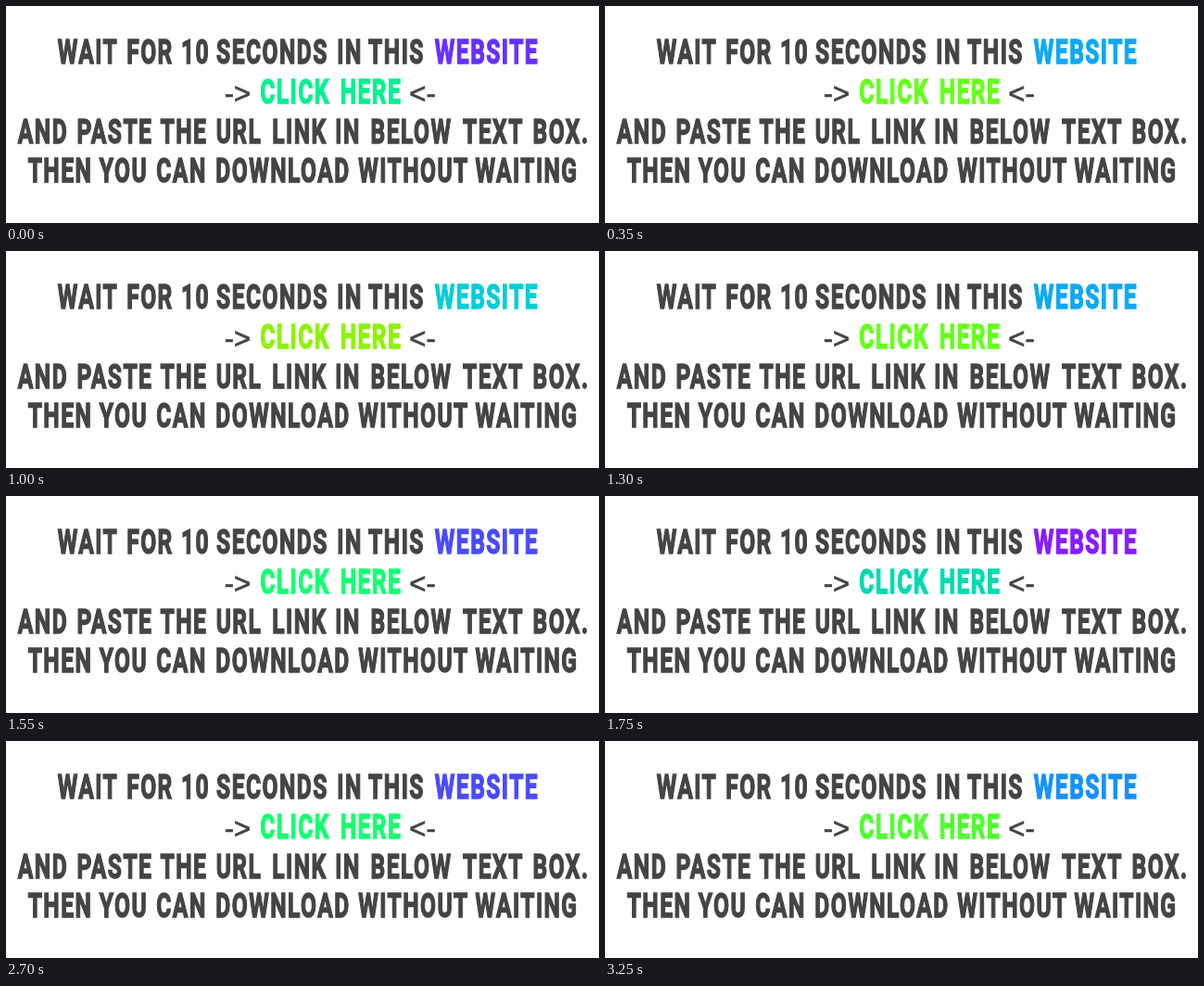
Write an HTML page that moves like this. It is 640 by 234 pixels and loops after 3900 ms.

```html
<!DOCTYPE html>
<html lang="en">
<head>
<meta charset="utf-8">
<style>
  html, body { margin: 0; width: 100%; height: 100%; overflow: hidden; background: #fff; }
  svg { display: block; width: 640px; height: 234px; }
  text { fill: currentColor; stroke: currentColor; text-anchor: middle; }
  .bold {
    font: 700 37px Roboto, "Liberation Sans", sans-serif;
    letter-spacing: 2.2px; stroke-width: 1.5; stroke-miterlimit: 3;
  }
  .thin { font: 31px "Liberation Sans", Arial, sans-serif; stroke-width: 0.7; }
</style>
</head>
<body>
<svg viewBox="0 0 640 234" color="#444"></svg>
<script>
const svg = document.querySelector("svg");
const LOOP = 3900, STEP = 50, LAST = 3250, CONDENSE = 0.665;

function addText(string, x, y, type) {
  const el = document.createElementNS("http://www.w3.org/2000/svg", "text");
  const scale = type === "bold" ? ` scale(${CONDENSE} 1)` : "";
  el.setAttribute("class", type);
  el.setAttribute("transform", `translate(${x} ${y})${scale}`);
  el.textContent = string;
  svg.append(el);
  return el;
}

// Each line: baseline, words, centre of each word
const lines = [
  [62.3, "WAIT FOR 10 SECONDS IN THIS WEBSITE", [88.5, 155.5, 204.5, 287.5, 371, 421.5, 519]],
  [104.8, "CLICK HERE", [312, 394]],
  [148.3, "AND PASTE THE URL LINK IN BELOW TEXT BOX.",
    [40, 117.5, 192, 251.5, 317, 369, 437.5, 526, 599]],
  [190.3, "THEN YOU CAN DOWNLOAD WITHOUT WAITING", [58.5, 127, 189.5, 299, 440, 562]]
];
const words = lines.map(([y, line, xs]) =>
  line.split(" ").map((word, i) => addText(word, xs[i], y, "bold")));
addText("->", 250, 105, "thin");
addText("<-", 449.5, 105, "thin");

const website = words[0][6];
const link = words[1];

// Hue swing: [time, degrees]
const hues = [[0, 253], [550, 179], [1300, 199], [1550, 240], [2150, 302], [2700, 240], [3250, 209]];

function slope(i) {
  const a = hues[Math.max(i - 1, 0)], b = hues[Math.min(i + 1, hues.length - 1)];
  return (b[1] - a[1]) / (b[0] - a[0]);
}

// Smooth cubic curve through the points
function hueAt(t) {
  let i = 0;
  while (i < hues.length - 2 && t > hues[i + 1][0]) i++;
  const [t0, h0] = hues[i], [t1, h1] = hues[i + 1];
  const d = t1 - t0, u = (t - t0) / d, v = 1 - u;
  return v * v * (1 + 2 * u) * h0 + u * u * (1 + 2 * v) * h1
    + d * u * v * (v * slope(i) - u * slope(i + 1));
}

function rainbow(hue, level) {
  const channel = shift =>
    Math.max(0, Math.min(255, Math.round(level + 136 * Math.cos((hue - shift) * Math.PI / 180))));
  return `rgb(${channel(0)},${channel(120)},${channel(240)})`;
}

const start = performance.now();
function draw() {
  const t = (performance.now() - start) % LOOP;
  const hue = hueAt(Math.min(LAST, Math.floor(t / STEP) * STEP));
  website.style.color = rainbow(hue, 142);
  for (const word of link) word.style.color = rainbow(hue - 97, 130);
  requestAnimationFrame(draw);
}
draw();
</script>
</body>
</html>
```
